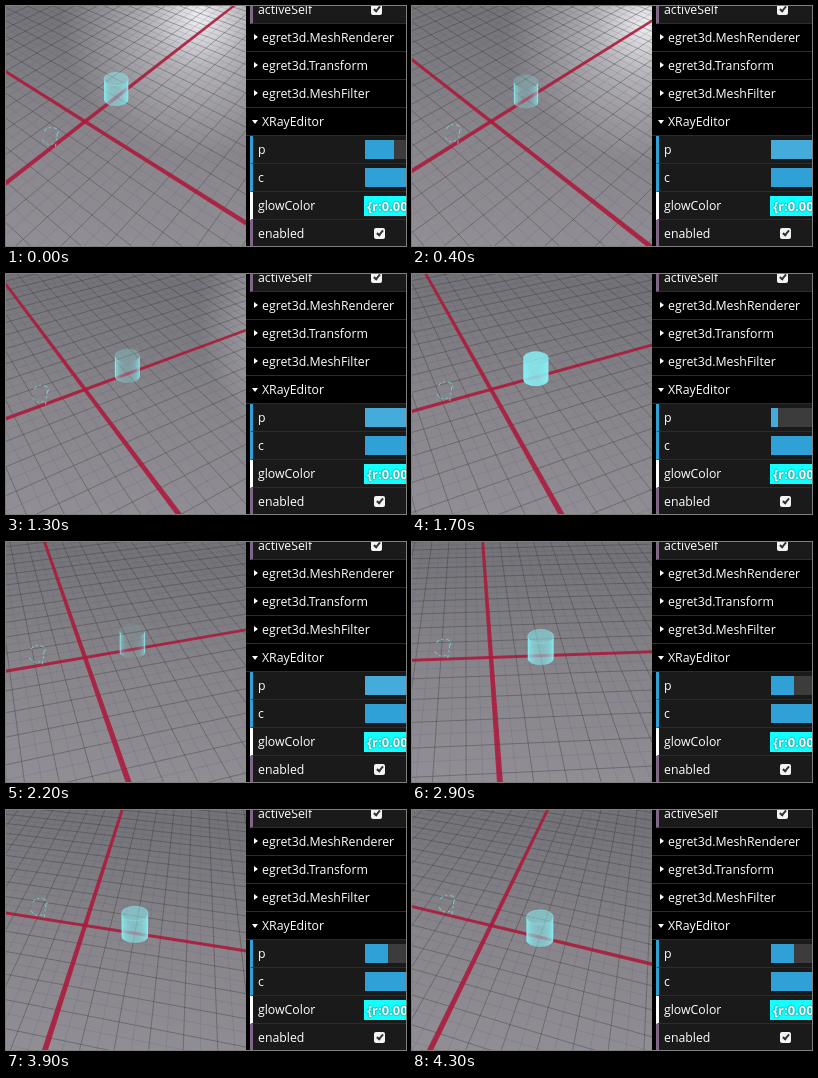
Recreate the animation shown at these times as an HTML page with a canvas. Size 400 by 240 pixels, loop 4400 ms.

```html
<!DOCTYPE html>
<html lang="en">
<head>
<meta charset="utf-8">
<style>
html, body { margin: 0; width: 100%; height: 100%; overflow: hidden; background: #000; }
canvas { position: absolute; left: 0; top: 0; }
#panel { position: absolute; left: 240px; top: -10px; width: 160px; height: 250px; overflow: hidden;
  background: #000; color: #fff; font: 12.3px/27px "Open Sans", sans-serif; }
.row { position: relative; box-sizing: border-box; height: 28px; border-bottom: 1px solid #2c2c2c; white-space: nowrap; }
.head { padding-left: 16px; }
.head::before { content: ""; position: absolute; left: 8px; top: 10px; border: 3px solid transparent;
  border-left: 4px solid #fff; border-right: 0; }
.head.open::before { top: 12px; left: 6px; border: 3px solid transparent; border-top: 4px solid #fff; border-bottom: 0; }
.field { margin-left: 4px; padding-left: 5px; border-left: 3px solid var(--tone); background: #1a1a1a; }
.slider { position: absolute; left: 112px; top: 4px; width: 60px; height: 19px; background: #3c3c3c; }
.slider i { display: block; height: 100%; background: #2fa1d6; }
.color { position: absolute; left: 111px; top: 4px; width: 60px; height: 20px; padding-left: 3px;
  background: #1ff; font: bold 13px/20px "Open Sans", sans-serif; text-shadow: 0 0 2px #000a; }
.check { position: absolute; left: 121px; top: 8px; width: 11px; height: 11px; background: #f4f4f4; border-radius: 2px; }
.check::after { content: ""; position: absolute; left: 4px; top: 1px; width: 2px; height: 5px;
  border: solid #333; border-width: 0 2px 2px 0; transform: rotate(40deg); }
</style>
</head>
<body>
<canvas id="scene" width="240" height="240"></canvas>
<div id="panel">
  <div class="row field" style="--tone:#806787">activeSelf<b class="check" style="left:118px"></b></div>
  <div class="row head">egret3d.MeshRenderer</div>
  <div class="row head">egret3d.Transform</div>
  <div class="row head">egret3d.MeshFilter</div>
  <div class="row head open">XRayEditor</div>
  <div class="row field" style="--tone:#2fa1d6">p<div class="slider"><i id="power"></i></div></div>
  <div class="row field" style="--tone:#2fa1d6">c<div class="slider"><i></i></div></div>
  <div class="row field" style="--tone:#fff">glowColor<div class="color">{r:0.00</div></div>
  <div class="row field" style="--tone:#806787">enabled<b class="check"></b></div>
</div>
<script>
const LOOP = 4400, STEP = 100, RAD = Math.PI / 180;
const ORIGIN_X = 79, ORIGIN_Y = 115.5;
const TILT = 0.7, DEPTH = 0.00196, CAMERA = 260;  // sine of pitch, perspective, ground distance
const CELL = 12.5, EXTENT = 700;
const START_YAW = 48, TURN = 15.56;               // degrees, degrees per second

const ctx = document.getElementById('scene').getContext('2d');
const power = document.getElementById('power');
const powers = [[0, 29], [500, 55], [900, 90], [1700, 7], [2200, 90], [2900, 23]];

function sample(keys, t) {
  const next = keys.findIndex(key => key[0] > t);
  if (next < 0) return keys[keys.length - 1][1];
  const [t0, v0] = keys[next - 1], [t1, v1] = keys[next];
  return v0 + (v1 - v0) * (t - t0) / (t1 - t0);
}

// Camera space on the ground: u to the right, v away from the viewer
function toScreen(u, v) {
  const scale = 1 / (1 + DEPTH * v);
  return { x: ORIGIN_X + u * scale, y: ORIGIN_Y - v * TILT * scale, scale };
}

function makeView(yaw) {
  const s = Math.sin(yaw * RAD), c = Math.cos(yaw * RAD);
  const project = (x, z) => toScreen(x * c - z * s, x * s + z * c);
  // Ends of a ground line, cut before it passes behind the camera
  const ends = (offset, alongX) => {
    const base = 1 + DEPTH * offset * (alongX ? c : s);
    const slope = DEPTH * (alongX ? s : c);
    let from = -EXTENT, to = EXTENT;
    if (Math.abs(slope) > 1e-6) {
      const cut = (0.2 - base) / slope;
      if (slope > 0) from = Math.max(from, cut); else to = Math.min(to, cut);
    } else if (base < 0.2) return null;
    if (from >= to) return null;
    return [from, to].map(v => alongX ? project(v, offset) : project(offset, v));
  };
  return { project, ends };
}

function drawLight(yaw) {
  const base = ctx.createLinearGradient(20, 0, 0, 240);
  base.addColorStop(0, '#747377');
  base.addColorStop(0.5, '#87858a');
  base.addColorStop(1, '#918e95');
  ctx.fillStyle = base;
  ctx.fillRect(0, 0, 240, 240);

  // Highlight circles the point below the camera
  const angle = (19 + START_YAW - yaw) * RAD;
  const spot = toScreen(500 * Math.sin(angle), 500 * Math.cos(angle) - CAMERA);
  const glow = ctx.createRadialGradient(spot.x, spot.y, 5, spot.x, spot.y, 140);
  glow.addColorStop(0, 'rgba(255,253,255,.85)');
  glow.addColorStop(0.35, 'rgba(250,248,252,.45)');
  glow.addColorStop(1, 'rgba(240,238,245,0)');
  ctx.fillStyle = glow;
  ctx.fillRect(0, 0, 240, 240);
}

function drawGrid(ends) {
  for (const alongX of [true, false]) {
    for (let i = -EXTENT / CELL; i <= EXTENT / CELL; i++) {
      const line = ends(i * CELL, alongX);
      if (!line) continue;
      const major = i % 2 === 0;
      ctx.strokeStyle = major ? 'rgba(50,48,56,.4)' : 'rgba(80,78,125,.2)';
      ctx.lineWidth = 0.9;
      ctx.beginPath();
      for (const { x, y } of line) ctx.lineTo(x, y);
      ctx.stroke();
    }
  }
  ctx.fillStyle = 'rgba(174,26,60,.87)';
  for (const alongX of [true, false]) {
    const left = ends(-2.2, alongX), right = ends(2.2, alongX);
    ctx.beginPath();
    for (const { x, y } of [left[0], left[1], right[1], right[0]]) ctx.lineTo(x, y);
    ctx.fill();
  }
}

function drawCylinder({ x, y, scale }, exponent) {
  const r = 13 * scale, flat = 7 * scale, middle = y - 8.5 * scale;
  const top = middle - 11 * scale, bottom = middle + 11 * scale;
  const glow = alpha => `rgba(136,250,254,${alpha.toFixed(3)})`;
  const side = ctx.createLinearGradient(x - r, 0, x + r, 0);
  for (let i = 0; i <= 16; i++) {
    const n = i / 8 - 1, facing = Math.sqrt(1 - n * n) * TILT;
    side.addColorStop(i / 16, glow(0.95 * (1 - facing) ** exponent));
  }
  ctx.fillStyle = side;
  ctx.beginPath();
  ctx.ellipse(x, top, r, flat, 0, Math.PI, 0, true);
  ctx.ellipse(x, bottom, r, flat, 0, 0, Math.PI);
  ctx.fill();
  ctx.fillStyle = glow(0.95 * (1 - TILT) ** exponent);
  ctx.beginPath();
  ctx.ellipse(x, top, r, flat, 0, 0, Math.PI * 2);
  ctx.fill();
  if (exponent < 1) {
    ctx.strokeStyle = glow(0.4);
    ctx.lineWidth = 1;
    ctx.stroke();
  }
}

function drawSmallShape(ground) {
  const x = ground.x, y = ground.y - 10 * ground.scale;
  ctx.strokeStyle = 'rgba(125,228,235,.75)';
  ctx.lineWidth = 1;
  ctx.setLineDash([4, 2, 2, 3]);
  ctx.beginPath();
  ctx.ellipse(x + 1, y - 6, 7, 4, 0, Math.PI, Math.PI * 2.2);
  ctx.moveTo(x + 7, y - 5);
  ctx.lineTo(x + 5, y + 9);
  ctx.moveTo(x - 8, y + 2);
  ctx.quadraticCurveTo(x - 4, y + 9, x + 3, y + 6);
  ctx.stroke();
  ctx.setLineDash([]);
}

function draw() {
  const t = Math.floor(performance.now() % LOOP / STEP) * STEP;
  const yaw = START_YAW - TURN * t / 1000;
  const level = sample(powers, t);
  const { project, ends } = makeView(yaw);
  drawLight(yaw);
  drawGrid(ends);
  drawSmallShape(project(-48, 0));
  drawCylinder(project(50, 0), level / 42);
  power.style.width = Math.min(60, Math.round(level)) + 'px';
  power.style.background = t > 0 && t < 2900 ? '#44abda' : '#2fa1d6';
  requestAnimationFrame(draw);
}
draw();
</script>
</body>
</html>
```
